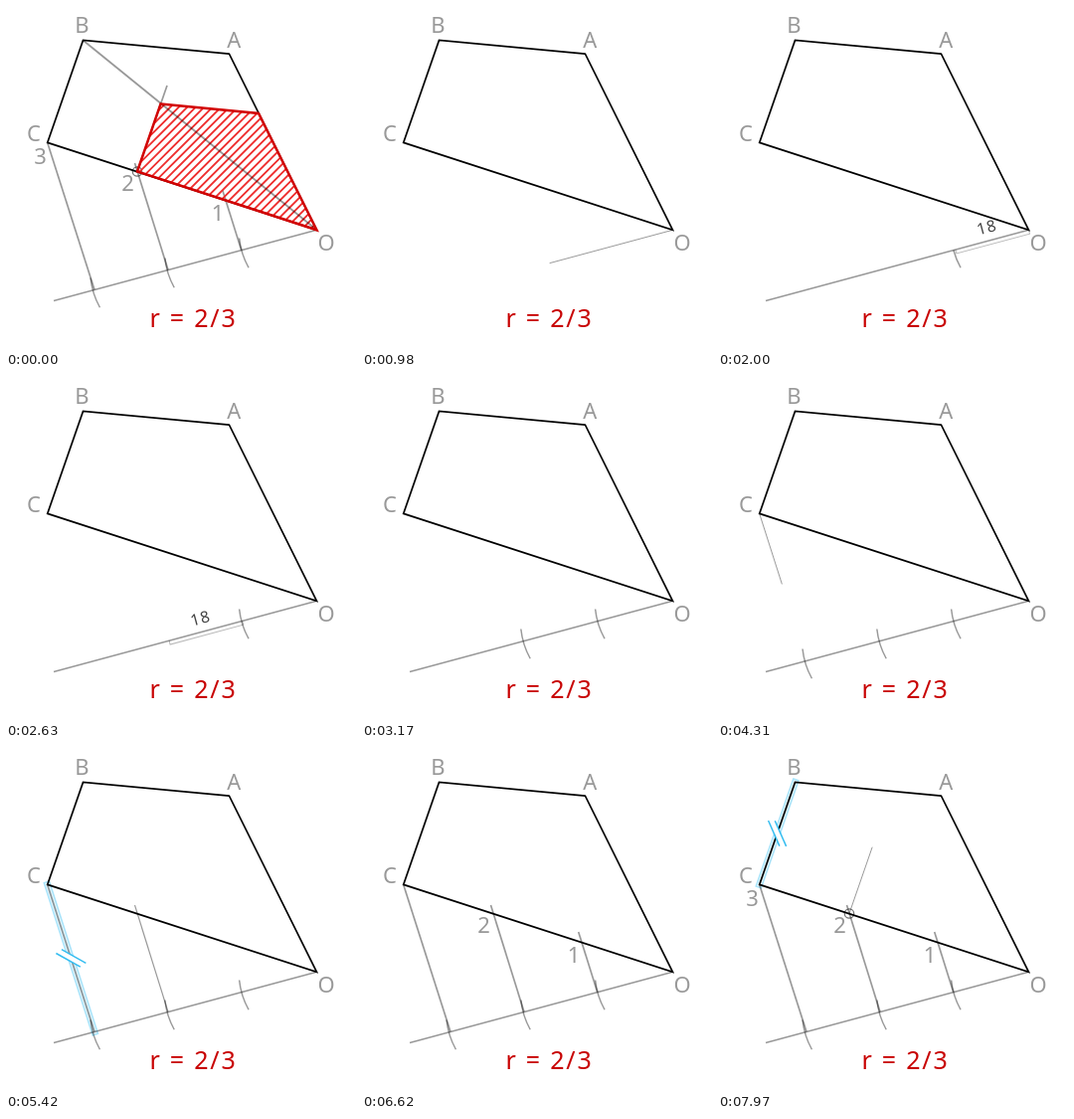
Write an HTML page with a canvas that moves like this. It is 352x345 px and loops after 8 s.

```html
<!DOCTYPE html>
<html lang="en">
<head>
<meta charset="utf-8">
<title>Scaling a quadrilateral</title>
<style>
html, body { margin: 0; width: 100%; height: 100%; overflow: hidden; background: #fff; }
canvas { display: block; }
</style>
</head>
<body>
<canvas id="stage" width="352" height="345"></canvas>
<script>
const ctx = document.getElementById('stage').getContext('2d');
const A = [224.5, 48.2], B = [77.5, 34.5], C = [41.7, 137.4], O = [312.5, 225.3], RAY_END = [48, 296.5];
const P1 = [236.7, 245.5], P2 = [163, 265.5], P3 = [89, 285.5];
const Q1 = [217.7, 185], Q2 = [129.5, 158], M = [132, 166.5], M_END = [162, 80];
const SMALL = [[155.5, 98.5], [254, 108], O, M];
const GRAY = 'rgba(0,0,0,.4)', RED = '#d20000', LABEL = '#999';
const STEP = [-74.8, 20], RADIUS = 78.3, LOW = 29, REST = 15, HIGH = 6;
const rad = deg => deg * Math.PI / 180;
const ramp = (t, from, to) => Math.min(1, Math.max(0, (t - from) / (to - from)));
const mix = (a, b, k) => a + (b - a) * k;
const between = (p, q, k) => [mix(p[0], q[0], k), mix(p[1], q[1], k)];

function path(points, closed) {
  ctx.beginPath();
  points.forEach(p => ctx.lineTo(...p));
  if (closed) ctx.closePath();
}

function stroke(color, width) {
  ctx.strokeStyle = color;
  ctx.lineWidth = width;
  ctx.stroke();
}

function text(str, x, y, color, size, spacing = 0) {
  ctx.font = size + 'px "Noto Sans", sans-serif';
  ctx.letterSpacing = spacing + 'px';
  ctx.fillStyle = color;
  ctx.textAlign = 'center';
  ctx.fillText(str, x, y);
}

const label = (str, x, y) => text(str, x, y, LABEL, 22);

// A thin line that grows, then thickens once complete
function growLine(t, p, q, from, to) {
  if (t <= from) return;
  path([p, between(p, q, ramp(t, from, to))]);
  stroke(GRAY, mix(1, 1.7, ramp(t, to, to + 90)));
}

// The compass rests on the ray, drops, then sweeps up leaving an arc
function compass(t, x, y) {
  const sweep = ramp(t, 1800, 2130);
  const angle = t < 1800 ? mix(REST, LOW, ramp(t, 1700, 1800)) : mix(LOW, HIGH, sweep);
  if (sweep > 0) {
    ctx.beginPath();
    ctx.arc(x, y, RADIUS, Math.PI - rad(LOW), Math.PI - rad(angle));
    stroke(GRAY, 1.5);
  }
  const alpha = ramp(t, 1530, 1660) * (1 - ramp(t, 2150, 2240));
  if (!alpha) return;
  ctx.save();
  ctx.globalAlpha = alpha;
  ctx.translate(x, y);
  ctx.rotate(rad(-angle));
  path([[0, 0], [0, 4], [-RADIUS + 2, 4], [-RADIUS + 2, 0]]);
  stroke('rgba(0,0,0,.28)', 1);
  text('18', -40, -8, '#444', 16, 1);
  ctx.restore();
}

function glow(alpha, p, q) {
  if (!alpha) return;
  ctx.save();
  ctx.globalAlpha = alpha;
  ctx.lineCap = 'square';
  path([p, q]);
  stroke('#a9e4fb', 7);
  stroke('#e6f7fe', 4);
  ctx.restore();
}

function parallelMark(alpha, p, q) {
  if (!alpha) return;
  ctx.save();
  ctx.globalAlpha = alpha;
  ctx.translate(...between(p, q, .5));
  ctx.rotate(Math.atan2(q[1] - p[1], q[0] - p[0]) - rad(43));
  ctx.fillStyle = '#fff';
  ctx.fillRect(-9, -3, 18, 6);
  for (const y of [-3, 3]) {
    path([[-14 - y / 2, y], [14 - y / 2, y]]);
    stroke('#35bdf0', 1.5);
  }
  ctx.restore();
}

function result() {
  ctx.save();
  path(SMALL, true);
  ctx.clip();
  for (let x = 20; x < 320; x += 8.5) {
    path([[x, 230], [x + 140, 90]]);
    stroke('#ee2c2c', 1.9);
  }
  ctx.restore();
  path([B, O]);
  stroke(GRAY, 1.8);
  path(SMALL, true);
  stroke(RED, 2.5);
}

function construction(t) {
  growLine(t, O, RAY_END, 700, 1300);
  for (let i = 0; i < 3; i++) compass(t - 930 * i, O[0] + STEP[0] * i, O[1] + STEP[1] * i);
  growLine(t, C, P3, 4100, 4540);
  growLine(t, P2, Q2, 4950, 5400);
  growLine(t, P1, Q1, 5900, 6140);
  if (t >= 6350) label('1', 213, 216);
  if (t >= 6620) label('2', 122.5, 186);
  if (t >= 6860) label('3', 34.5, 158.5);
  if (t >= 7130) {
    ctx.beginPath();
    ctx.arc(...M, 4.7, 0, 7);
    stroke('rgba(0,0,0,.55)', 1.2);
  }
  growLine(t, M, M_END, 7550, 8095);
}

function draw(now) {
  const clock = now % 8000, opening = clock < 700;
  const t = opening ? 9000 : clock;
  const marks = [
    [ramp(t, 4680, 4860) * (1 - ramp(t, 5500, 5620)), C, P3],
    [ramp(t, 5650, 5830) * (1 - ramp(t, 6200, 6320)), Q2, P2],
    [opening ? 0 : ramp(t, 7370, 7520), B, C]
  ];
  ctx.globalAlpha = 1;
  ctx.fillStyle = '#fff';
  ctx.fillRect(0, 0, 352, 345);
  marks.forEach(m => glow(...m));

  path([A, B, C, O], true);
  stroke('#000', 1.7);
  label('A', 229.3, 42);
  label('B', 76.5, 27);
  label('C', 28, 135.5);
  label('O', 322, 246);
  text('r = 2/3', 188.5, 323, '#c80000', 25, 1.8);

  if (opening) ctx.globalAlpha = 1 - ramp(clock, 500, 690);
  construction(t);
  if (opening) result();
  marks.forEach(m => parallelMark(...m));
  requestAnimationFrame(draw);
}
requestAnimationFrame(draw);
</script>
</body>
</html>
```
